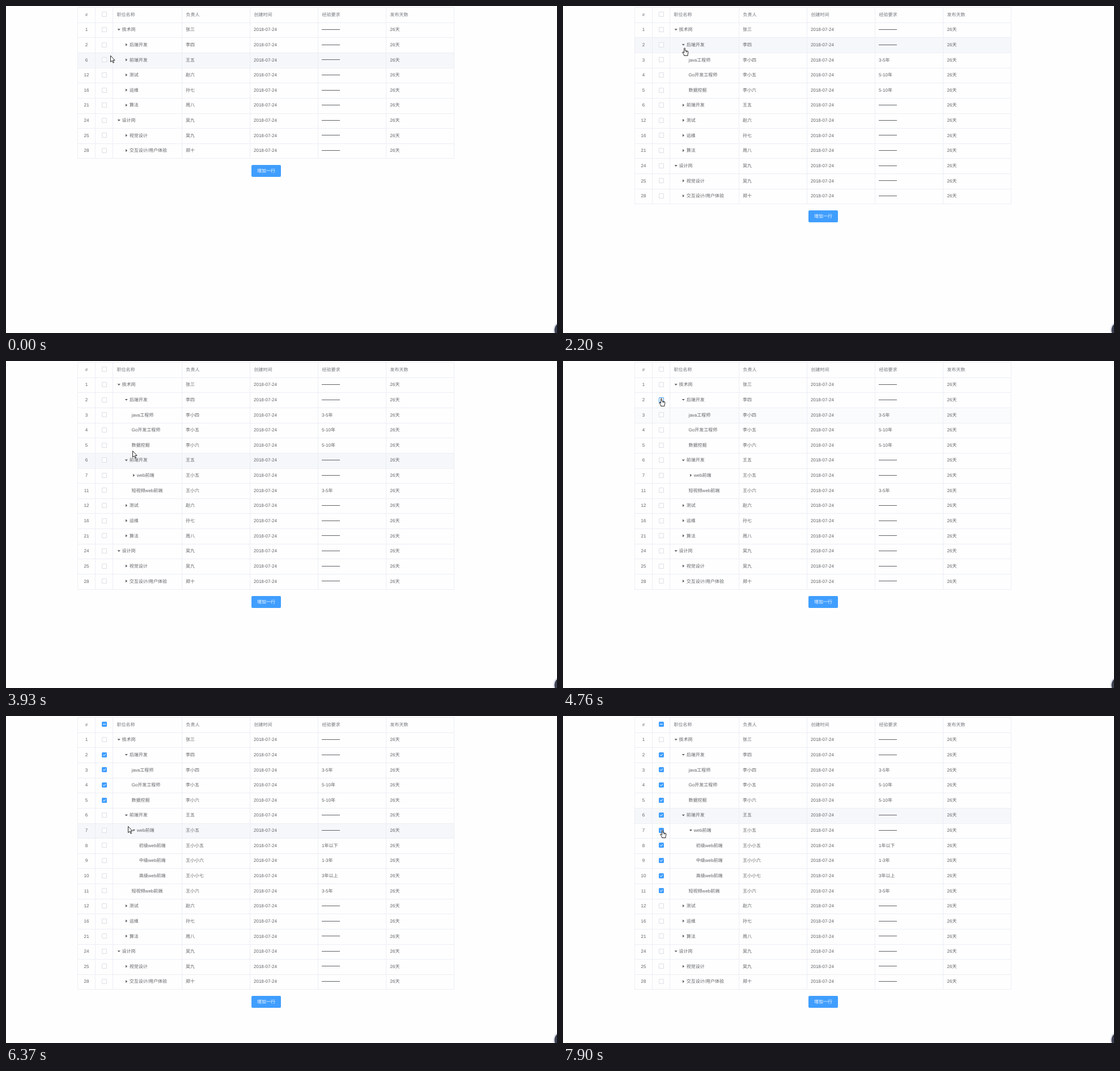
Animation, 972 px wide and 576 px high, one loop 8 s. Source, as an HTML page with a canvas:

```html
<!DOCTYPE html>
<html lang="zh-CN">
<head>
<meta charset="utf-8">
<style>
html, body { margin: 0; width: 100%; height: 100%; overflow: hidden; background: #fefefe; }
canvas { display: block; }
</style>
</head>
<body>
<canvas id="stage" width="972" height="576"></canvas>
<script>
const ctx = document.getElementById('stage').getContext('2d');
const LOOP = 8000, PITCH = 26.63, TOP = 2.1, LEFT = 126, WIDTH = 665;
const BLUE = '#409eff', LINE = '#ebeef5', INK = '#606266', HEAD = '#74777d';
const FONT = '8px "Liberation Sans", "Noto Sans CJK SC", "Noto Sans CJK", sans-serif';
const HEADINGS = ['职位名称', '负责人', '创建时间', '经验要求', '发布天数'];

const leaf = (id, name, owner, exp) => ({ id, name, owner, exp });
const group = (id, name, owner, opensAt = Infinity, ...children) => ({ id, name, owner, opensAt, children });

const TREE = [
  group(1, '技术岗', '张三', 0,
    group(2, '后端开发', '李四', 2080,
      leaf(3, 'java工程师', '李小四', '3-5年'),
      leaf(4, 'Go开发工程师', '李小五', '5-10年'),
      leaf(5, '数据挖掘', '李小六', '5-10年')),
    group(6, '前端开发', '王五', 3500,
      group(7, 'web前端', '王小五', 6100,
        leaf(8, '初级web前端', '王小小五', '1年以下'),
        leaf(9, '中级web前端', '王小小六', '1-3年'),
        leaf(10, '高级web前端', '王小小七', '3年以上')),
      leaf(11, '短视频web前端', '王小六', '3-5年')),
    group(12, '测试', '赵六'),
    group(16, '运维', '孙七'),
    group(21, '算法', '周八')),
  group(24, '设计岗', '吴九', 0,
    group(25, '视觉设计', '吴九'),
    group(28, '交互设计/用户体验', '郑十'))
];

// Ticking a group also ticks everything below it
const TICKED_AT = { 2: 5030, 6: 7510 };

// Pointer moves: start, end, target x, target y
const START = { x: 184, y: 87 };
const MOVES = [
  [430, 780, 182, 105], [780, 1520, 214, 69], [2080, 3060, 215, 174], [3900, 3930, 223, 158],
  [4150, 4760, 173, 65], [5030, 5450, 173, 156], [5560, 5960, 219, 195],
  [6240, 6820, 189, 186], [6900, 7090, 173, 176], [7510, 7900, 175, 200]
];

const ARROW = new Path2D('M0 0V11L2.6 8.7 4.4 12.6 6 11.9 4.3 8.1H7.6Z');
const HAND = new Path2D('M-.9 1Q0-.4 .9 1V5L5.4 6Q6.6 6.4 6.5 8L5.6 11.5V14H-.9V12.5L-3.6 8.6Q-3.9 7.2-2.6 7.4L-.9 9Z');
const KNUCKLES = new Path2D('M2.6 5.5V8M4.4 6V8');

const lineY = i => Math.round(TOP + PITCH * i);
const midY = i => 14.9 + PITCH * i;
const columnX = i => i < 3 ? LEFT + 31 * i : Math.round(310 + 120.1 * (i - 3));
const textX = i => columnX(i) + 7;
const indent = depth => 195.4 + 13.1 * depth;
const ease = k => k * k * (3 - 2 * k);

function pointerAt(t) {
  let { x, y } = START;
  for (const [from, to, toX, toY] of MOVES) {
    const k = ease(Math.min(1, Math.max(0, (t - from) / (to - from))));
    x += (toX - x) * k;
    y += (toY - y) * k;
  }
  return { x: Math.round(x), y: Math.round(y) };
}

function visibleRows(nodes, t, depth = 0, ticked = false) {
  return nodes.flatMap(node => {
    const on = ticked || t >= TICKED_AT[node.id], open = t >= node.opensAt;
    return [{ node, depth, on, open }, ...(open ? visibleRows(node.children, t, depth + 1, on) : [])];
  });
}

const near = (p, x, y, reach) => Math.abs(p.x - x) < reach && Math.abs(p.y - y) < reach;

function rect(x, y, w, h, color) {
  ctx.fillStyle = color;
  ctx.fillRect(x, y, w, h);
}

function text(s, x, mid, color = INK, align = 'left') {
  ctx.fillStyle = color;
  ctx.textAlign = align;
  ctx.fillText(s, x, Math.round(mid + 2.8));
}

function roundBox(x, y, w, h, r, color) {
  ctx.beginPath();
  ctx.roundRect(x, y, w, h, r);
  ctx.fillStyle = color;
  ctx.fill();
}

function disc(x, y, r, color) {
  roundBox(x - r, y - r, 2 * r, 2 * r, r, color);
}

function checkbox(mid, border, fill, mark) {
  const y = Math.round(mid - 4.5);
  roundBox(169, y, 9, 9, 1.5, border);
  roundBox(170, y + 1, 7, 7, .7, fill);
  if (!mark) return;
  ctx.strokeStyle = '#fff';
  ctx.lineWidth = 1;
  ctx.stroke(new Path2D(mark === 'tick' ? `M171.3 ${y + 4.5}l1.7 1.7 3-3.4` : `M171 ${y + 4.5}h5`));
}

function caret(x, y, open) {
  ctx.fillStyle = INK;
  ctx.fill(new Path2D(open ? `M${x - 2.6} ${y - 1.2}h5.2l-2.6 2.9Z` : `M${x - 1.3} ${y - 2.6}l3.1 2.6-3.1 2.6Z`));
}

function drawRow({ node, depth, on, open }, y, pointer) {
  const x = indent(depth), hover = near(pointer, 173.5, y, 6);
  text(node.id, 142, y, INK, 'center');
  checkbox(y, on || hover ? BLUE : '#dcdfe6', on ? BLUE : '#fff', on && 'tick');
  if (node.children) caret(x + 3.8, y, open);
  text(node.name, node.children ? x + 9.2 : x, y);
  text(node.owner, textX(3), y);
  text('2018-07-24', textX(4), y);
  if (node.exp) text(node.exp, textX(5), y);
  else rect(textX(5), Math.floor(y), 32, 1, INK);
  text('26天', textX(6) + .5, y);
}

function drawPointer({ x, y }, hand) {
  const shape = hand ? HAND : ARROW;
  ctx.save();
  ctx.translate(x + .5, y + .5);
  ctx.fillStyle = '#fff';
  ctx.strokeStyle = '#111';
  ctx.lineWidth = .9;
  ctx.fill(shape);
  ctx.stroke(shape);
  if (hand) ctx.stroke(KNUCKLES);
  ctx.restore();
}

function draw(t) {
  const rows = visibleRows(TREE, t), bottom = lineY(rows.length + 1);
  const pointer = pointerAt(t), trail = pointerAt(t - 250);
  const overControl = rows.some(({ node, depth }, i) => near(pointer, 173.5, midY(i + 1), 6) ||
    node.children && near(pointer, indent(depth) + 3.8, midY(i + 1), 7));

  rect(0, 0, 972, 576, '#fefefe');
  ctx.font = FONT;
  ctx.textRendering = 'geometricPrecision';

  // The highlight trails the pointer and stays pale while it moves fast
  const fast = Math.hypot(pointer.x - trail.x, pointer.y - trail.y) > 30;
  rect(LEFT, lineY(Math.floor((trail.y - TOP) / PITCH)), WIDTH, PITCH, fast ? '#fafbfc' : '#f5f7fa');

  for (let i = 0; i <= rows.length + 1; i++) rect(LEFT, lineY(i), WIDTH, 1, LINE);
  for (let i = 0; i < 8; i++) rect(columnX(i), 2, 1, bottom - 2, LINE);

  const some = rows.some(row => row.on);
  text('#', 142, midY(0), HEAD, 'center');
  checkbox(midY(0), some ? BLUE : '#dcdfe6', some ? BLUE : '#fff', some && 'dash');
  HEADINGS.forEach((s, i) => text(s, textX(i + 2) + .4, midY(0), HEAD));
  rows.forEach((row, i) => drawRow(row, midY(i + 1), pointer));

  roundBox(433, bottom + 12, 52, 21, 2, BLUE);
  ctx.font = '500 ' + FONT;
  text('增加一行', 459, bottom + 22.6, '#fff', 'center');

  disc(982, 571, 17, '#e3e6ec');
  disc(982, 571, 14.5, '#3f4252');
  drawPointer(pointer, overControl);
}

function loop() {
  draw(performance.now() % LOOP);
  requestAnimationFrame(loop);
}
loop();
</script>
</body>
</html>
```
